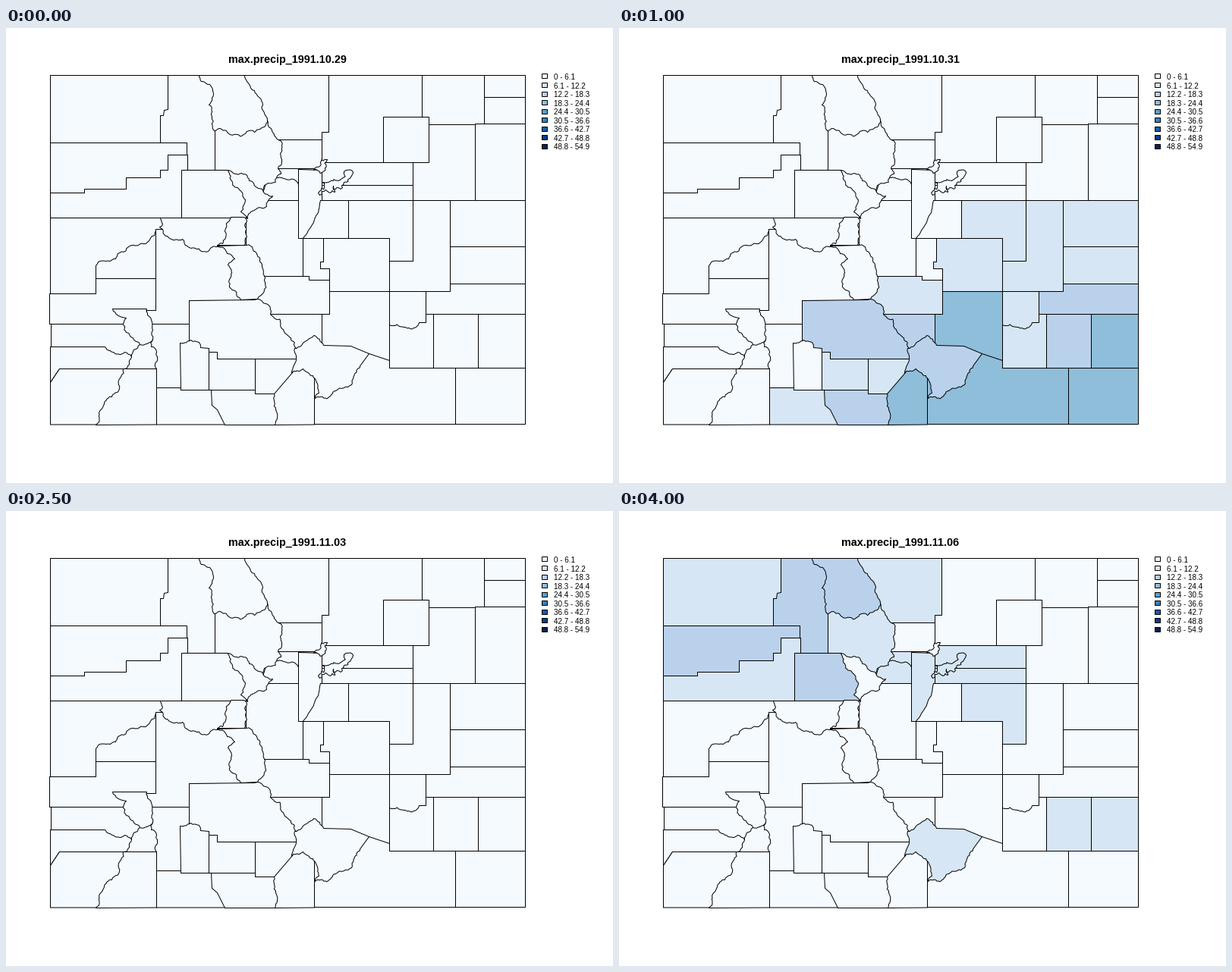
A matplotlib script for the animation above (4.5 s loop, 800x600 px).

```python
import random
from math import hypot

import matplotlib.pyplot as plt
from matplotlib.animation import FuncAnimation
from matplotlib.patches import Polygon, Rectangle

W, H, DPI = 800, 600, 100
PX = 72 / DPI  # points per pixel
SHADES = ["#f5faff", "#d6e6f4", "#bad1ec", "#8fbeda", "#5a9fcd",
          "#367fbb", "#1c5ca6", "#0a3d89", "#0a2259"]
DAYS = ["10.29", "10.30", "10.31"] + [f"11.{d:02d}" for d in range(1, 7)]
STORMS = ["10.30", "10.31", "11.02", "11.06"]  # one shade digit each in a county's code
FRONTS = ["11.01", "11.05"]                    # light rain in the north-west only

plt.rcParams["font.family"] = "Liberation Sans"
rng = random.Random(4)

fig = plt.figure(figsize=(W / DPI, H / DPI), dpi=DPI, facecolor="white")
ax = fig.add_axes([0, 0, 1, 1])
ax.set_xlim(0, W)
ax.set_ylim(H, 0)
ax.axis("off")

counties = []


def wander(a, b, amp):
    """Points from a up to b, bent by midpoint displacement."""
    (x0, y0), (x1, y1) = a, b
    if hypot(x1 - x0, y1 - y0) < 3.5:
        return [a]
    k = rng.uniform(-amp, amp)
    mid = ((x0 + x1) / 2 - k * (y1 - y0), (y0 + y1) / 2 + k * (x1 - x0))
    return wander(a, mid, amp) + wander(mid, b, amp)


def rough(*keys, amp=0.2):
    """Ridge or river line through a few key points."""
    line = [p for a, b in zip(keys, keys[1:]) for p in wander(a, b, amp)]
    return line + [keys[-1]]


def shape(code, *pts):
    """Add a county; later ones cover the hidden parts of earlier ones."""
    patch = Polygon([(x + 0.5, y + 0.5) for x, y in pts], ec="black", lw=PX,
                    joinstyle="round", snap=False, zorder=1 + len(counties) / 100)
    ax.add_patch(patch)
    xs, ys = zip(*pts)
    north_west = min(xs) + max(xs) < 500 and min(ys) + max(ys) < 500
    rain = dict(zip(STORMS, map(int, code)))
    rain.update((day, int(north_west)) for day in FRONTS)
    counties.append((patch, rain))


def block(code, x, y, *turns):
    """Right-angled county: turns are the next x, next y, and so on."""
    pts = [(x, y)]
    for i, v in enumerate(turns):
        px, py = pts[-1]
        pts.append((px, v) if i % 2 else (v, py))
    shape(code, *pts, (x, pts[-1][1]))


# north-west
block("1001", 58, 62, 213, 152)
shape("2012", (213, 62), (285, 62), (285, 187), (203, 187), (203, 115), (207, 115),
      (208, 108), (213, 107))
block("3011", 58, 167, 239, 250)
block("3012", 58, 151, 238, 167, 213, 187, 203, 197, 158, 212, 103, 217)

# north-east
block("2001", 300, 62, 425, 137, 416, 148)
block("1000", 425, 62, 548, 177, 416, 137)
block("1000", 548, 62, 630, 127)
block("0000", 630, 62, 684, 91)
block("1000", 630, 91, 684, 126)
block("1000", 536, 127, 618, 227)
block("1000", 618, 126, 684, 227)
block("1000", 497, 117, 557, 177)
block("2001", 416, 177, 536, 207)
block("2011", 416, 207, 536, 227)

# eastern plains
block("1100", 585, 227, 684, 288)
block("1110", 585, 288, 684, 337)
block("1210", 553, 337, 684, 377)
block("1110", 505, 227, 585, 347)
block("1111", 451, 227, 536, 307, 505, 277)
block("1110", 505, 377, 563, 448)
shape("1110", (505, 347), (553, 347), (553, 388),
      *rough((544, 388), (541, 393), (524, 394), (505, 391)))
block("1221", 563, 377, 622, 448)
block("0321", 622, 377, 684, 448)
block("0310", 592, 448, 684, 522)

# front range
block("2020", 316, 227, 391, 327)
block("3022", 231, 187, 316, 250)
block("1020", 340, 147, 416, 185)
block("1021", 340, 185, 385, 206)
shape("1021", *rough((385, 206), (365, 198), (358, 197)), (345, 195), (335, 227),
      (385, 227))
block("2010", 391, 227, 451, 277)
shape("2011", (385, 186), (416, 187), (416, 227),
      *rough((414, 227), (405, 256), (391, 277), amp=0.08), (385, 277))
block("1010", 391, 277, 426, 333)
block("1110", 418, 277, 505, 347, 426, 317, 414, 308)
block("2310", 416, 347, 505, 438)
block("3110", 320, 327, 399, 332, 426, 377)
block("4210", 340, 377, 416, 424)
shape("3310", (406, 430), (478, 429), (505, 438), (505, 448), (592, 448), (592, 522),
      (406, 522))

# western slope
block("3020", 58, 250, 212, 350)
block("2010", 118, 330, 197, 390, 57, 350)
block("3020", 197, 265, 310, 359, 241, 390, 185, 372)
shape("2010", *rough((118, 313), (137, 307), (147, 297), (166, 286), (180, 284),
                     (197, 267)), (197, 330), (118, 330))
shape("3020", (203, 250), (305, 250), (305, 288),
      *rough((278, 288), (266, 294), (249, 290), (232, 278), (218, 278), (206, 265),
             (202, 262), (206, 258), (203, 250)))
shape("5210", (241, 359), (327, 358),
      *rough((331, 357), (348, 376), (365, 397), (382, 422)), (385, 436), (241, 436))

# central mountains
shape("2020", *rough((313, 249), (317, 254), (315, 262), (317, 275), (314, 286)),
      *rough((278, 286), (285, 284), (288, 268), (296, 249)))
shape("3020", (278, 287), *rough((314, 286), (330, 297), (337, 312), (341, 335), (331, 357)),
      *rough((309, 358), (294, 341), (292, 312), (301, 304), (291, 297), (278, 287)))
shape("1021", (275, 187), (275, 130), (338, 112),
      *rough((344, 121), (349, 132), (361, 148), (361, 165), (363, 173), (358, 185),
             (362, 192), (342, 206), (338, 213)), (310, 205), (292, 187))
shape("0002", (254, 62), *rough((314, 62), (327, 82), (338, 101), (344, 121), (340, 130),
                                (327, 137), (290, 135), (274, 135), (271, 110), (267, 101),
                                (272, 82), (268, 74), (257, 70), (254, 62)))
shape("2020", *rough((292, 187), (310, 191), (325, 203), (338, 213), (351, 221), (343, 235),
                     (318, 251), (309, 242), (315, 226), (307, 213), (298, 203), (292, 187)))

# south-west
block("2000", 59, 390, 180, 440)
shape("2000", (58, 420), (130, 420), *rough((130, 420), (156, 427), (165, 433)),
      (172, 449), (70, 449), (58, 467))
shape("1000", (58, 467), (70, 449), (165, 449), (130, 522.5), (58, 522.5))
block("3010", 185, 390, 241, 474)
shape("3000", (198, 449), (198, 522.5),
      *rough((118, 523), (122, 507), (139, 486), (148, 470), (154, 449)))
shape("3000", *rough((176, 417), (165, 433), (154, 449)),
      *rough((198, 449), (199, 433), (191, 420), (193, 410)), (180, 403))
shape("2010", (140, 370), *rough((185, 370), (186, 378), (193, 398), (193, 410), (176, 417),
                                 (162, 403), (154, 389), (158, 382), (140, 370)))

# south
block("7100", 198, 474, 300, 522.5)
shape("8200", (270, 477), (362, 477), (362, 523), (288, 523), (278, 503), (271, 497))
block("8100", 267, 427, 278, 436, 328, 477)
block("3100", 328, 436, 385, 482)
shape("6000", *rough((229, 415), (243, 411), (254, 414), (256, 421)), (267, 422),
      (267, 477), (230, 477))
shape("3310", (377, 454), *rough((353, 482), (355, 503), (354, 523)), (406, 522.5),
      (406, 440), (385, 440))
shape("2211", *rough((380, 422), (397, 411), (405, 405), (418, 418)), (454, 419), (478, 429),
      *rough((467, 444), (455, 470), (434, 478), (407, 488), (404, 458), (391, 449),
             (376, 455), (382, 432), (380, 422)))

# scattered city limits
shape("1011", *rough((416, 203), (441, 199), (445, 189), (456, 188), (454, 196), (431, 208),
                     (433, 216), (421, 213), (413, 220), (416, 203), amp=0.4))
shape("1000", *rough((405, 187), (414, 181), (423, 173), (420, 184), (405, 187), amp=0.4))

# legend
top = 54.9 / 9
for i, shade in enumerate(SHADES):
    y = 64.5 + 11.52 * i
    ax.add_patch(Rectangle((706.5, round(y) - 3.5), 7, 6, fc=shade, ec="black", lw=PX,
                           snap=False))
    label = f"{top * i + 0.001:.3g} - {top * (i + 1) + 0.001:.3g}"
    ax.text(722, y + 3.6, label.replace("0.001", "0"), size=9.9 * PX, va="baseline")

title = ax.text(371, 46, "", size=14.4 * PX, weight="bold", ha="center", va="baseline")


def draw(i):
    title.set_text(f"max.precip_1991.{DAYS[i]}")
    for patch, rain in counties:
        patch.set_facecolor(SHADES[rain.get(DAYS[i], 0)])
    return [title] + [patch for patch, _ in counties]


anim = FuncAnimation(fig, draw, frames=len(DAYS), interval=500, repeat=True)
plt.show()
```
